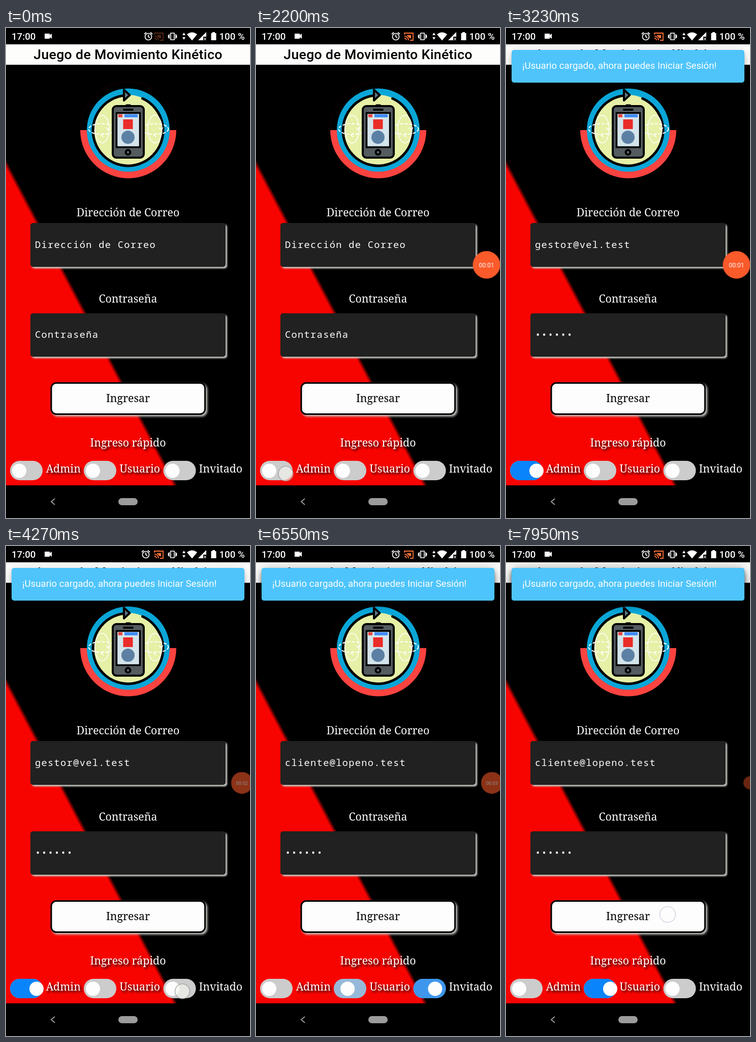
An HTML page that plays this animation: 480x960 px, repeating every 8 s.

```html
<!DOCTYPE html>
<html lang="es">
<head>
<meta charset="utf-8">
<title>Juego de Movimiento Kinético</title>
<style>
@property --on { syntax: "<number>"; inherits: true; initial-value: 0; }

html, body { margin: 0; width: 100%; height: 100%; overflow: hidden; background: #000; }
svg { position: absolute; left: 0; top: 0; width: 480px; height: 960px; }

.sans { font-family: Roboto, sans-serif; }
.serif { font: 21.33px "Noto Serif", serif; fill: #fff; }
.mono { font: 18.67px "Noto Sans Mono", monospace; letter-spacing: 1.33px; fill: #fff; }
.status { font-size: 18.67px; font-weight: 500; fill: #fff; }
.title { font-size: 26.67px; font-weight: 500; letter-spacing: .33px; }
.mid { text-anchor: middle; }
.shade { filter: drop-shadow(3px 3px 2px #000); }
.field { fill: #202120; filter: drop-shadow(3px 3px 1.8px #c8c8c4); }
.button { fill: #fdfdfd; stroke: #000; stroke-width: 3; filter: drop-shadow(3px 3px 2px #c8c8c4); }
.line { fill: none; stroke: #fff; stroke-width: 1.7; }

/* status icons settling */
.alarm { animation: alarm 8s infinite; }
.cast { animation: cast 8s infinite; }
@keyframes alarm { 0% { transform: translateX(5px); } 5%, 100% { transform: none; } }
@keyframes cast { 0% { opacity: .35; } 5%, 100% { opacity: 1; } }

/* switches: --on runs from 0 to 1 */
.switch { animation: 8s ease infinite; }
.track { fill: #ccc; }
.lit { fill: #0a84fa; opacity: var(--on); }
.knob { fill: #fdfdfd; transform: translateX(calc(var(--on) * 34px)); }
.admin { animation-name: admin; }
.user { animation-name: user; }
.guest { animation-name: guest; }
@keyframes admin { 0%, 30% { --on: 0; } 40%, 58% { --on: 1; } 68%, 100% { --on: 0; } }
@keyframes guest { 0%, 58% { --on: 0; } 68%, 80% { --on: 1; } 90%, 100% { --on: 0; } }
@keyframes user { 0%, 80% { --on: 0; } 90%, 100% { --on: 1; } }

/* field values and counter */
.swap { animation: 8s step-end infinite; }
.v0 { animation-name: v0; }
.v1 { animation-name: v1; }
.v2 { animation-name: v2; }
.v3 { animation-name: v3; }
.dots { animation-name: dots; }
@keyframes v0 { 0% { opacity: 1; } 30.5%, 100% { opacity: 0; } }
@keyframes v1 { 0% { opacity: 0; } 30.5% { opacity: 1; } 58%, 100% { opacity: 0; } }
@keyframes v2 { 0% { opacity: 0; } 58% { opacity: 1; } 80%, 100% { opacity: 0; } }
@keyframes v3 { 0% { opacity: 0; } 80%, 100% { opacity: 1; } }
@keyframes dots { 0% { opacity: 0; } 30.5%, 100% { opacity: 1; } }

.c0 { animation-name: c0; }
.c1 { animation-name: c1; }
.c2 { animation-name: c2; }
.c3 { animation-name: c3; }
@keyframes c0 { 0% { opacity: 1; } 22%, 100% { opacity: 0; } }
@keyframes c1 { 0% { opacity: 0; } 22% { opacity: 1; } 47%, 100% { opacity: 0; } }
@keyframes c2 { 0% { opacity: 0; } 47% { opacity: 1; } 73%, 100% { opacity: 0; } }
@keyframes c3 { 0% { opacity: 0; } 73%, 100% { opacity: 1; } }

/* recorder bubble */
.bubble { animation: bubble 8s ease-out infinite; }
.count { font-size: 12px; fill: #fff; text-anchor: middle; animation: count 8s linear infinite; }
@keyframes bubble {
  0%, 5% { transform: translateX(60px); opacity: 1; }
  9%, 46% { transform: none; opacity: 1; }
  50%, 92.5% { transform: translateX(10.5px) scale(.79); opacity: .56; }
  98.5%, 100% { transform: translateX(26.5px) scale(.48); opacity: .42; }
}
@keyframes count { 0%, 92.5% { opacity: 1; } 97%, 100% { opacity: 0; } }

/* touches */
.touch { fill: rgba(245, 245, 240, .65); stroke: rgba(150, 150, 150, .7); stroke-width: 1.7; animation: 8s linear infinite; }
.t1 { animation-name: t1; }
.t2 { animation-name: t2; }
.t3 { animation-name: t3; }
.t4 { animation-name: t4; fill: none; stroke: #d8d8e6; }
@keyframes t1 { 0%, 25% { opacity: 0; } 26%, 28.5% { opacity: 1; } 31%, 100% { opacity: 0; } }
@keyframes t2 { 0%, 51.5% { opacity: 0; } 52.5%, 56% { opacity: 1; } 58.5%, 100% { opacity: 0; } }
@keyframes t3 { 0%, 76% { opacity: 0; } 77%, 78.5% { opacity: 1; } 80.5%, 100% { opacity: 0; } }
@keyframes t4 { 0%, 97% { opacity: 0; } 98%, 100% { opacity: 1; } }

/* toasts stack on top of each other */
.toast {
  position: absolute; left: 11px; top: 43px; width: 437px; height: 64px; padding-left: 21px;
  font: 18.67px/63px Roboto, sans-serif; color: #fff; white-space: nowrap;
  background: #4ec4fb; border-radius: 5px;
  box-shadow: 0 4px 6.7px -1.3px rgba(0,0,0,.2), 0 8px 13.3px rgba(0,0,0,.14), 0 1.3px 24px rgba(0,0,0,.12);
  animation: 8s cubic-bezier(.36, .66, .04, 1) infinite;
}
.n1 { animation-name: n1; }
.n2 { animation-name: n2; }
.n3 { animation-name: n3; }
@keyframes n1 { 0%, 31% { opacity: 0; } 39%, 100% { opacity: 1; } }
@keyframes n2 { 0%, 59% { opacity: 0; } 66%, 100% { opacity: 1; } }
@keyframes n3 { 0%, 81% { opacity: 0; } 88%, 100% { opacity: 1; } }
</style>
</head>
<body>
<svg viewBox="0 0 480 960">
  <defs>
    <linearGradient id="split" gradientUnits="userSpaceOnUse" x1="-3.6" y1="267.4" x2="3.6" y2="263.6">
      <stop offset="0" stop-color="#f80400"/><stop offset="1" stop-color="#000"/>
    </linearGradient>
    <g id="orbit" fill="none" stroke="#fff">
      <ellipse rx="26.5" ry="10.5" stroke-width="2" stroke-dasharray="6 3"/>
      <ellipse rx="14" ry="27" stroke-width="1.4"/>
      <path d="M3 8l-5 4 5 4M8-3l4 5 4-5" stroke-width="1.6"/>
    </g>
    <g id="toggle">
      <rect class="track" width="64" height="38" rx="19"/>
      <rect class="lit" width="64" height="38" rx="19"/>
      <circle class="knob" cx="18" cy="19.5" r="14"/>
    </g>
  </defs>

  <rect width="480" height="960"/>
  <rect y="72" width="480" height="824" fill="url(#split)"/>

  <!-- status bar -->
  <g class="sans status">
    <text x="11" y="23">17:00</text>
    <text x="419.5" y="23">100 %</text>
  </g>
  <path d="M76 11h10v3l4-3v10l-4-3v3h-10z" fill="#fff"/>
  <g class="alarm">
    <circle class="line" cx="275" cy="17" r="6.5"/>
    <path class="line" d="M275 13v4l3 2M267 12l4-3.5M283 12l-4-3.5"/>
  </g>
  <g class="cast" fill="none" stroke="#fb7238" stroke-width="1.8">
    <path d="M292 13v-3h17v14h-6M292 16a8 8 0 0 1 8 8M292 20a4 4 0 0 1 4 4"/>
    <path d="M296 14h9v6h-3z" fill="#fb7238" stroke="none"/>
  </g>
  <path class="line" d="M324 10h7v13h-7zM321 12v9M334 12v9M319.5 14v5M335.5 14v5"/>
  <path d="M347 14l3-5 3 5zM347 18h6l-3 5zM356 12.5q10-8 20 0l-10 12zM394 8v9h-6v7h-10z" fill="#fff"/>
  <path d="M389.5 19l4 5m0-5l-4 5" stroke="#fff" stroke-width="1.2"/>
  <path d="M406 8h5v2h2.5v14h-10v-14h2.5z" fill="#fff"/>

  <rect y="32" width="480" height="40" fill="#fdfdfc"/>
  <text class="sans title mid" x="240" y="61">Juego de Movimiento Kinético</text>

  <!-- emblem -->
  <path d="M146 200a94.5 94.5 0 0 1 189 0" fill="none" stroke="#180300"/>
  <path d="M146 200a94.5 94.5 0 0 0 189 0z" fill="#fb4340"/>
  <circle cx="240.5" cy="200" r="81.5" fill="#0aa6d8"/>
  <circle cx="240" cy="201" r="70" fill="#e6f0a6"/>
  <path d="M268.5 138A69 69 0 1 1 236 132" fill="none" stroke="#000" stroke-width="5" stroke-linecap="round"/>
  <path d="M232 121v21l11.5-10.5z" fill="#5c7884" stroke="#000" stroke-width="4" stroke-linejoin="round"/>
  <use href="#orbit" x="189" y="198"/>
  <use href="#orbit" x="293" y="198"/>
  <rect x="210" y="153" width="61" height="101" rx="7" fill="#545c60" stroke="#000" stroke-width="4"/>
  <path d="M237 151.5h7M232 160h17" stroke="#000" stroke-width="4" stroke-linecap="round"/>
  <rect x="217.5" y="166.5" width="46" height="67" fill="#d4e4ea" stroke="#000" stroke-width="3.5"/>
  <rect x="221" y="169" width="8" height="6" fill="#ea4640"/>
  <rect x="233" y="169" width="26" height="6" fill="#3f8cf5"/>
  <rect x="230.5" y="179" width="19" height="19" fill="#ea2c28"/>
  <circle cx="240" cy="214" r="13" fill="#5c80a4"/>
  <circle cx="240" cy="243.5" r="4.5" fill="#5a6266" stroke="#000" stroke-width="4"/>

  <!-- form -->
  <g class="serif">
    <text class="mid" x="240" y="369">Dirección de Correo</text>
    <text class="mid" x="240" y="538">Contraseña</text>
  </g>
  <rect class="field" x="48" y="382" width="384" height="86" rx="5"/>
  <rect class="field" x="48" y="559" width="384" height="85" rx="5"/>
  <g class="mono">
    <text class="swap v0" x="57" y="431">Dirección de Correo</text>
    <text class="swap v1" x="57" y="431">gestor@vel.test</text>
    <text class="swap v2" x="57" y="431">visitante@mirupo.test</text>
    <text class="swap v3" x="57" y="431">cliente@lopeno.test</text>
    <text class="swap v0" x="57" y="607">Contraseña</text>
    <text class="swap dots" x="57" y="607">••••••</text>
  </g>
  <rect class="button" x="89" y="695.5" width="302.5" height="61" rx="10"/>
  <text class="serif mid" x="240" y="733" style="fill:#000">Ingresar</text>

  <!-- quick access -->
  <g class="serif shade">
    <text class="mid" x="240" y="820">Ingreso rápido</text>
    <text x="78.5" y="870.5">Admin</text>
    <text x="223.5" y="870.5">Usuario</text>
    <text x="379.5" y="870.5">Invitado</text>
  </g>
  <g class="switch admin"><use href="#toggle" x="8" y="848"/></g>
  <g class="switch user"><use href="#toggle" x="153" y="848"/></g>
  <g class="switch guest"><use href="#toggle" x="309.5" y="848"/></g>

  <!-- navigation bar -->
  <path d="M96 922l-7 6 7 6" fill="none" stroke="#999" stroke-width="2"/>
  <rect x="221" y="921" width="38" height="14" rx="7" fill="#9c9c9c"/>

  <circle class="touch t1" cx="58.5" cy="873" r="14.5"/>
  <circle class="touch t2" cx="347" cy="872.5" r="14.5"/>
  <circle class="touch t3" cx="188" cy="872" r="14.5"/>
  <circle class="touch t4" cx="318" cy="722" r="15.5"/>

  <g transform="translate(453.5 464)"><g class="bubble">
    <circle r="27" fill="#fb5a2a"/>
    <g class="sans count">
      <text class="swap c0" y="4.5">00:00</text>
      <text class="swap c1" y="4.5">00:01</text>
      <text class="swap c2" y="4.5">00:02</text>
      <text class="swap c3" y="4.5">00:03</text>
    </g>
  </g></g>
</svg>
<div class="toast n1">¡Usuario cargado, ahora puedes Iniciar Sesión!</div>
<div class="toast n2">¡Usuario cargado, ahora puedes Iniciar Sesión!</div>
<div class="toast n3">¡Usuario cargado, ahora puedes Iniciar Sesión!</div>
</body>
</html>
```
